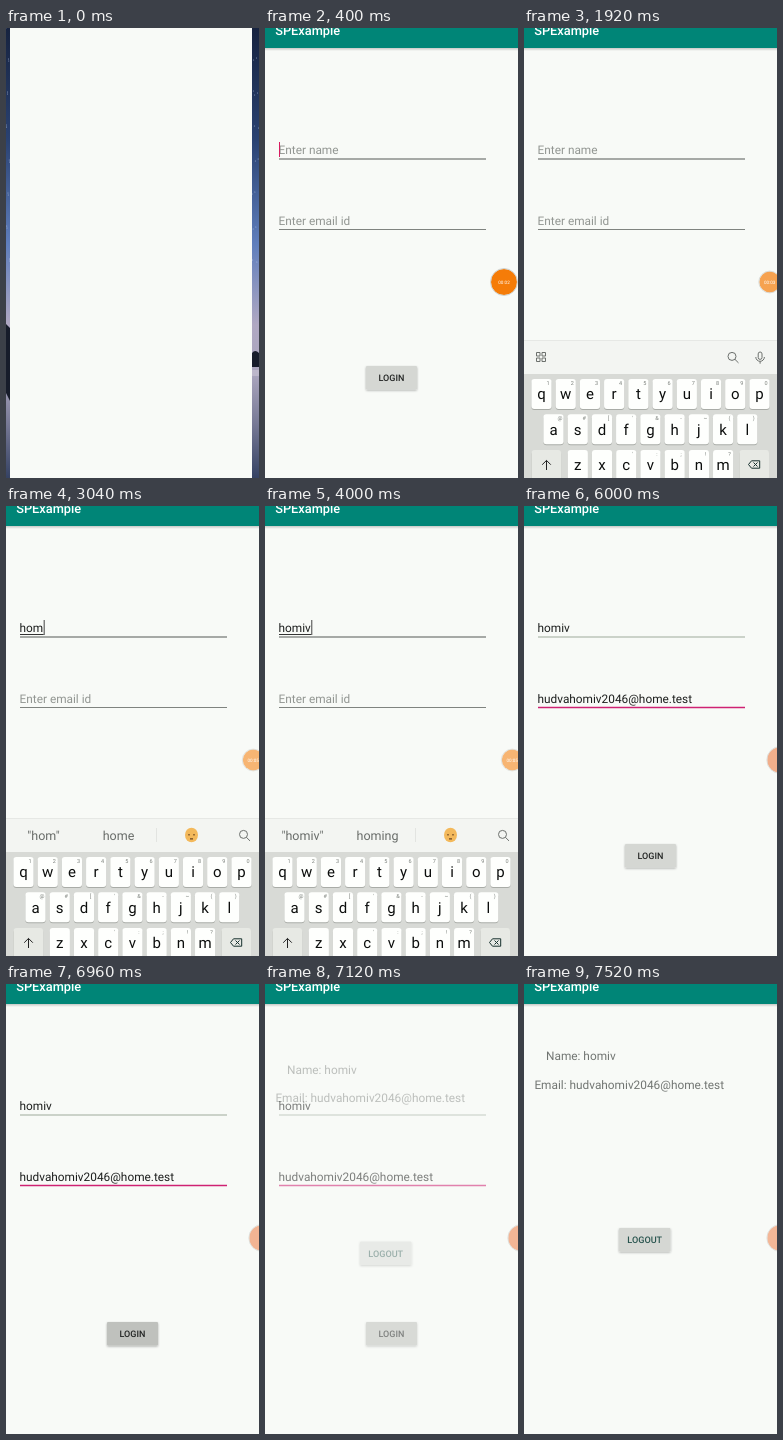
Write an HTML page that moves like this. It is 253x450 px and loops after 8 s.

```html
<!DOCTYPE html>
<html lang="en">
<head>
<meta charset="utf-8">
<title>SPExample</title>
<style>
  html, body { margin: 0; width: 100%; height: 100%; overflow: hidden; background: #f8faf7; }
  svg { display: block; width: 100vw; height: 100vh; }
  text { font-family: Roboto, "Open Sans", sans-serif; font-size: 11.85px; white-space: pre; text-rendering: geometricPrecision; }
  .medium { font-weight: 500; }
  .mid { text-anchor: middle; }
  .icon { fill: none; stroke: #6c706d; stroke-width: 1; }
  .key { fill: #fefffd; }
  .side { fill: #e7e9e4; }
  .letter { font-size: 15px; fill: #0c0e0d; }
  .mark { font-size: 5.5px; fill: #7c807c; }
  .word { font-size: 12.5px; fill: #686c69; }
  .menu { font-size: 7px; fill: #181a19; }
  .button { fill: #d5d7d3; }
</style>
</head>
<body>
<svg viewBox="0 0 253 450" preserveAspectRatio="none">
  <defs>
    <linearGradient id="night" x2="0" y2="1">
      <stop offset="0" stop-color="#17233f"/>
      <stop offset=".25" stop-color="#2a4272"/>
      <stop offset=".48" stop-color="#5f7ebc"/>
      <stop offset=".66" stop-color="#b0a8c2"/>
      <stop offset=".77" stop-color="#aaa5bd"/>
      <stop offset=".88" stop-color="#777995"/>
      <stop offset="1" stop-color="#354263"/>
    </linearGradient>
    <linearGradient id="barShade" x2="0" y2="1">
      <stop offset="0" stop-opacity=".2"/>
      <stop offset="1" stop-opacity="0"/>
    </linearGradient>
    <filter id="soft" x="-20%" y="-40%" width="140%" height="190%">
      <feDropShadow dx="0" dy="1" stdDeviation="1" flood-opacity=".32"/>
    </filter>
    <filter id="lift" x="-20%" y="-40%" width="140%" height="190%">
      <feDropShadow dx="0" dy="1" stdDeviation="2" flood-opacity=".28"/>
    </filter>
  </defs>

  <g id="wallpaper">
    <rect width="253" height="450" fill="url(#night)"/>
    <g id="stars" fill="#cbd9f5"></g>
    <path d="M0 296 4 300V373L0 365ZM246 325q3-4 7 0V339H246Z" fill="#171c2a"/>
    <path d="M246 342h7v6h-7z" fill="#d0c9d8" opacity=".5"/>
  </g>
  <rect id="sheet" height="450" fill="#f8faf7"/>

  <g id="login">
    <text id="nameText" x="13.5" y="126.2"></text>
    <path id="compose" stroke="#333" stroke-width="1"/>
    <path id="nameLine" d="M14 131H221"/>
    <text id="mailText" x="13.5" y="196.7"></text>
    <path id="mailLine" d="M14 201.5H221"/>
    <path id="cursor" stroke-width="1"/>
    <rect id="loginButton" class="button" x="101" y="338" width="51" height="23.5" rx="1" filter="url(#soft)"/>
    <text class="medium mid" x="126.4" y="353.3" style="font-size:9px" fill="#222423">LOGIN</text>
  </g>

  <g id="profile">
    <rect y="20" width="253" height="430" fill="#f8faf7"/>
    <g fill="#717572">
      <text id="nameOut" x="22" y="76"></text>
      <text id="mailOut" x="10.4" y="104.6"></text>
    </g>
    <rect class="button" x="95" y="244" width="51.5" height="23.5" rx="1" filter="url(#soft)"/>
    <text class="medium mid" x="120.7" y="259.2" style="font-size:9.1px" fill="#28544e">LOGOUT</text>
  </g>

  <g id="bar">
    <rect y="20" width="253" height="3" fill="url(#barShade)"/>
    <rect width="253" height="20" fill="#008577"/>
    <text class="medium" x="10.2" y="7.2" style="font-size:12.8px" fill="#fff">SPExample</text>
  </g>

  <g id="keyboard">
    <rect y="312" width="253" height="138" fill="#d8dad6"/>
    <rect y="312" width="253" height="34" fill="#f3f5f2"/>
    <path d="M0 312.5H253" stroke="#e6e8e5" stroke-width="1"/>
    <g id="tools" class="icon">
      <path d="M12.5 324.5h3.5v3.5h-3.5zM18 324.5h3.5v3.5h-3.5zM12.5 330h3.5v3.5h-3.5zM18 330h3.5v3.5h-3.5z"/>
      <rect x="234.2" y="324" width="3.8" height="7.4" rx="1.9"/>
      <path d="M231.8 329a4.3 4.3 0 0 0 8.6 0M236.1 333.3v2.4"/>
    </g>
    <g id="words">
      <text id="typedWord" class="word mid" x="37.5" y="334.3"></text>
      <text id="nextWord" class="word mid" x="112.5" y="334.3"></text>
      <path d="M150.5 322v14" stroke="#e2e4e1"/>
      <ellipse cx="185.5" cy="329" rx="6.5" ry="7.3" fill="#f3b95c"/>
      <path d="M183 328v1.6M188 328v1.6M184 332.8h3" stroke="#6c4521" stroke-width="1.3"/>
    </g>
    <g id="search" class="icon"><circle cx="208" cy="328.4" r="4"/><path d="M210.9 331.3 214.5 334.9"/></g>
    <g id="keys"></g>
    <path d="M22.5 442v-9.5M18.2 436.7l4.3-4.3 4.3 4.3" class="icon" style="stroke:#222"/>
    <path d="M224.5 436.5l3-3.7h8.2v7.4h-8.2zM229.5 434.5l4 4m0-4l-4 4" class="icon" style="stroke:#16302d"/>
  </g>

  <g id="popup">
    <rect x="5" y="142" width="104" height="30" rx="3" fill="#fafbf9" filter="url(#lift)"/>
    <path d="M38.3 143v28" stroke="#e6e8e5" stroke-width=".8"/>
    <text class="menu" x="12.7" y="159.3">Paste</text>
    <text class="menu" x="47" y="159.3">Frequent phrases</text>
  </g>

  <g id="ball">
    <circle id="disc"/>
    <circle id="ring" fill="none" stroke="#cfd1ce"/>
    <text id="timer" class="mid" y="1.7" style="font-size:4.6px" fill="#fff"></text>
  </g>
</svg>
<script>
const LOOP = 8000, STEP = 80;
const NAME = "homiv", MAIL = "hudvahomiv2046@home.test";
const TYPED_AT = [2400, 2640, 2880, 3280, 3520];
const GUESSES = ["he", "how", "home", "homing", "homing"];
const CURSOR_ON = [[320, 640], [1200, 1680], [2080, 3200], [3280, 3760],
                   [4000, 4240], [4400, 4560], [5360, 5840], [6240, 6720]];
// time, x, radius, opacity
const BALL = [[0, 239, 13, 1], [1360, 239, 13, 1], [1840, 245.7, 10.4, .7], [2640, 245.7, 10.4, .7],
              [2960, 247.2, 10.4, .55], [4400, 247.2, 10.4, .55], [4800, 256.3, 13, .62],
              [6000, 256.3, 13, .62], [7360, 256.3, 13, .55], [8000, 256.3, 13, .55]];

const el = Object.fromEntries([...document.querySelectorAll("[id]")].map(n => [n.id, n]));
const keyFaces = {};

function add(parent, tag, attrs, text = "") {
  const node = document.createElementNS("http://www.w3.org/2000/svg", tag);
  set(node, attrs);
  node.textContent = text;
  return parent.appendChild(node);
}
function set(node, attrs) {
  for (const k in attrs) node.setAttribute(k, attrs[k]);
}
const show = (node, on) => set(node, { opacity: +on });
const ramp = (t, a, b) => Math.min(1, Math.max(0, (t - a) / (b - a)));
const easeOut = p => 1 - (1 - p) ** 2;
const within = (t, a, b) => t >= a && t < b;

function addKey(x, y, w, cls) {
  add(el.keys, "rect", { x, y: y + 1, width: w, height: 30, rx: 3, fill: "#a9aca7" });
  return add(el.keys, "rect", { x, y, width: w, height: 30, rx: 3, class: cls });
}
function addRow(letters, marks, left, top) {
  [...letters].forEach((c, i) => {
    const x = left + i * 24.22;
    keyFaces[c] = addKey(x - 10.1, top, 20.2, "key");
    add(el.keys, "text", { x, y: top + 20.3, class: "letter mid" }, c);
    add(el.keys, "text", { x: x + 6.5, y: top + 5.8, class: "mark mid" }, marks[i]);
  });
}
addRow("qwertyuiop", "1234567890", 17.5, 351);
addRow("asdfghjkl", "@#['&-~()", 29.5, 386.2);
addRow("zxcvbnm", "  ':;!?", 53.8, 422);
addKey(7.6, 422, 29.5, "side");
addKey(215.5, 422, 29.5, "side");

for (let i = 0; i < 30; i++) {
  const x = i % 2 ? 246 + (i * 2.7) % 7 : (i * 1.7) % 4;
  add(el.stars, "circle", { cx: x, cy: (i * 67) % 235, r: .45 });
}
el.nameOut.textContent = "Name: " + NAME;
el.mailOut.textContent = "Email: " + MAIL;

function drawFields(t) {
  const count = TYPED_AT.filter(at => t >= at).length;
  const typed = NAME.slice(0, count);
  const mail = t >= 5280 ? MAIL : "";
  const onMail = t >= 4560;
  const fill = (node, value, hint) => {
    node.textContent = value || hint;
    set(node, { fill: value ? "#1c1e1d" : "#929692" });
  };
  fill(el.nameText, typed, "Enter name");
  fill(el.mailText, mail, "Enter email id");
  set(el.nameLine, { stroke: onMail ? "#bcc4ba" : "#565b57", "stroke-width": onMail ? 1.3 : 1.2 });
  set(el.mailLine, { stroke: onMail ? "#cf2273" : "#7f837f", "stroke-width": onMail ? 1.6 : 1 });

  const active = onMail ? mail : typed;
  const width = active ? (onMail ? el.mailText : el.nameText).getComputedTextLength() : 0;
  const x = 14.5 + width, y = onMail ? 185 : 114;
  set(el.cursor, { d: `M${x} ${y}v15`, stroke: active && !onMail ? "#444" : "#d81b60" });
  show(el.cursor, CURSOR_ON.some(([a, b]) => within(t, a, b)));
  set(el.compose, { d: `M14 128.5h${onMail ? 0 : width}` });

  const suggesting = count > 0 && !onMail;
  show(el.words, suggesting);
  show(el.tools, !suggesting);
  set(el.search, { transform: `translate(${suggesting ? 29.5 : 0} 0)` });
  el.typedWord.textContent = `"${typed}"`;
  el.nextWord.textContent = GUESSES[count - 1] || "";
  [...NAME].forEach((c, i) =>
    keyFaces[c].style.fill = within(t, TYPED_AT[i] - STEP, TYPED_AT[i]) ? "#e3e6e3" : "");
}

function drawBall(t) {
  const i = BALL.findLastIndex(k => k[0] <= t);
  const a = BALL[i], b = BALL[i + 1] || a;
  const p = a === b ? 0 : ramp(t, a[0], b[0]);
  const [, x, r, alpha] = a.map((v, k) => v + (b[k] - v) * p);
  const docked = t >= 4720;
  set(el.ball, { transform: `translate(${x} 254)`, opacity: ramp(t, 0, 320) });
  set(el.disc, { r, opacity: alpha, fill: docked ? "#ee7f48" : "#f57c08" });
  set(el.ring, { r: r + .5, opacity: alpha });
  el.timer.textContent = docked ? "" : "00:0" + (1 + Math.floor((t + 960) / 1000));
}

function draw(t) {
  const opening = t < STEP;
  show(el.wallpaper, opening);
  set(el.sheet, { x: opening ? 4 : 0, width: opening ? 242 : 253 });
  const appear = ramp(t, 80, 400);
  set(el.login, { opacity: appear });
  set(el.bar, { opacity: appear });

  drawFields(t);
  const up = easeOut(ramp(t, 1360, 1760)) - easeOut(ramp(t, 5760, 6000));
  set(el.keyboard, { transform: `translate(0 ${140 * (1 - up)})` });
  set(el.popup, { opacity: ramp(t, 4640, 4800) - ramp(t, 5200, 5360) });
  el.loginButton.style.fill = t >= 6720 ? "#bfc1bd" : "";

  const enter = easeOut(ramp(t, 7040, 7360));
  set(el.profile, { opacity: enter, transform: `translate(0 ${24 * (1 - enter)})` });
  drawBall(t);
}

const start = performance.now();
function tick() {
  const t = (performance.now() - start) % LOOP;
  draw(Math.floor(t / STEP) * STEP);
  requestAnimationFrame(tick);
}
tick();
</script>
</body>
</html>
```
